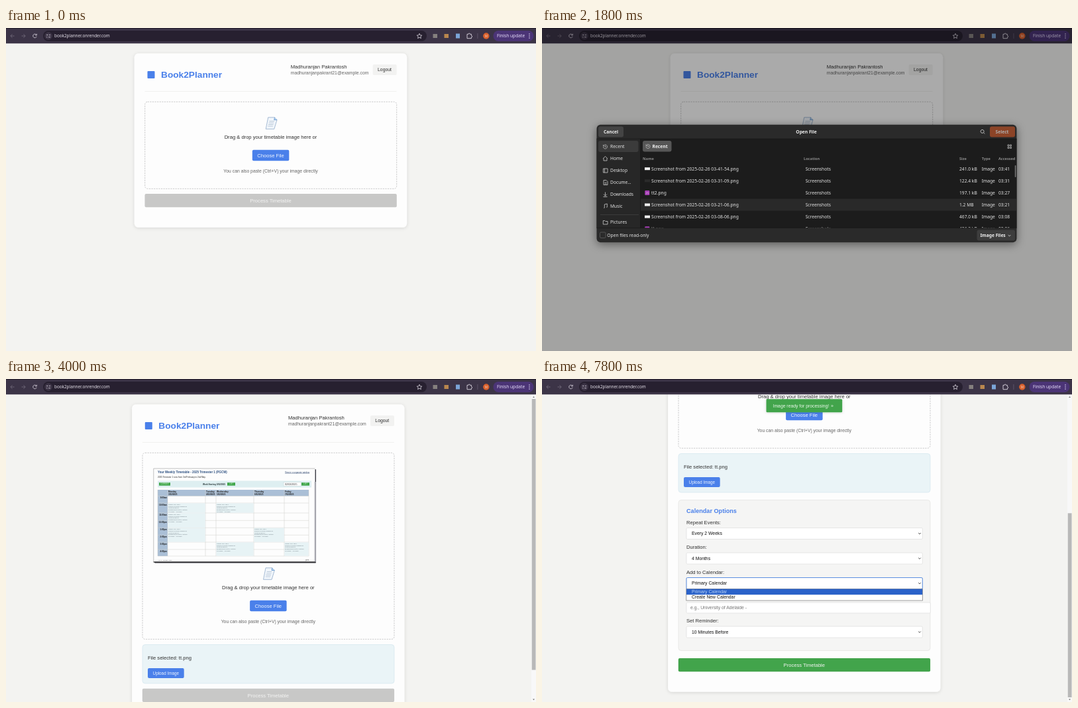
Write an HTML page that moves like this. It is 800 px wide and 487 px high and loops after 8000 ms.

```html
<!DOCTYPE html>
<html lang="en">
<head>
<meta charset="utf-8">
<title>Timetable upload</title>
<style>
html, body { margin: 0; width: 100%; height: 100%; overflow: hidden; background: #f3f3f1 }
svg { display: block; width: 800px; height: 487px }
text { white-space: pre }
.ui { font-family: "Noto Sans", "Open Sans", sans-serif }
.web { font-family: "Liberation Sans", Arial, sans-serif }
</style>
</head>
<body>
<script>
const BLUE = '#4a80ea', GREEN = '#42a44b', INK = '#303030';

// y is the middle of the capitals
const T = (x, y, s, size, fill, extra = '') =>
  `<text x="${x}" y="${y + size * .36}" font-size="${size}" fill="${fill}" ${extra}>${s}</text>`;
const R = (x, y, w, h, fill, r = 0, extra = '') =>
  `<rect x="${x}" y="${y}" width="${w}" height="${h}" rx="${r}" fill="${fill}" ${extra}/>`;
const P = (d, stroke, width = .8, fill = 'none') =>
  `<path d="${d}" stroke="${stroke}" stroke-width="${width}" fill="${fill}"/>`;
const G = (id, body, extra = '') => `<g id="${id}" ${extra}>${body}</g>`;
const MID = 'text-anchor="middle"', BOLD = 'font-weight="700"';
const line = c => `stroke="${c}" stroke-width=".7"`;
const clock = (x, y) => P(`M${x - 3} ${y}a3 3 0 1 0 1 -2.2M${x - 3} ${y - 3}v2h2M${x} ${y - 1.5}v1.7h1.4`, '#ccc', .7);
const down = (x, y, c) => P(`M${x - 1.8} ${y - .9}l1.8 1.8l1.8 -1.8`, c, .9);

function browserBar() {
  return R(0, 0, 800, 23.3, '#3c3447') + R(0, 0, 800, 1, '#211b29') +
    P('M12.5 12H7M9.5 9.3L6.8 12l2.7 2.7M23.5 12h5.5M26.500 9.3l2.7 2.7l-2.7 2.7', '#77707f') +
    P('M46 10.600a2.800 2.800 0 1 0 .2 2.200M46.300 8.700v2.200h-2.200', '#ddd8e2') +
    R(56, 4, 579, 16, '#272030', 8) +
    `<circle cx="64" cy="12" r="5.800" fill="#3d3547"/>` +
    P('M61 10.500h2.500M65 10.500h2M61 13.700h1.500M64 13.700h3', '#ddd8e2') +
    T(73, 12, 'book2planner.onrender.com', 6.35, '#e4dfe8') +
    P('M624 8.300l1.100 2.500l2.700 .3l-2 1.800l.6 2.700l-2.400 -1.400l-2.400 1.400l.6 -2.700l-2 -1.800l2.700 -.3z', '#ddd8e2', .8) +
    R(644.500, 9, 6.500, 6, '#85807e') + R(661.500, 9, 6.500, 6, '#b9874e') + R(679, 8.500, 6, 7, '#7ba5d8') +
    P('M696 9.300h2a1.200 1.200 0 0 1 2.400 0h2v2.300a1.200 1.200 0 0 1 0 2.400v1.700h-6.400z', '#ddd8e2', .9) +
    R(711.500, 8, .8, 8, '#665c72') +
    '<circle cx="724.800" cy="12" r="4.700" fill="#d9602c"/>' + T(724.8, 12, 'M', 4.6, '#f5d5c5', MID) +
    R(735.500, 4, 61, 16, '#4b3476', 8) + T(741, 12, 'Finish update', 6.65, '#e6dcfa') +
    [9, 12, 15].map(y => `<circle cx="790" cy="${y}" r=".8" fill="#e6dcfa"/>`).join('');
}

function preview() {
  const cols = [229, 244, 301, 317, 374, 420, 457];
  const rows = [176.5, 187, 202, 213.3, 224.3, 235.3, 246, 257, 267];
  const days = ['Monday', 'Tuesday', 'Wednesday', 'Thursday', 'Friday'];
  const hours = ['9:00am', '10:00am', '11:00am', '12:00pm', '1:00pm', '2:00pm', '3:00pm', '4:00pm'];
  const events = [[1, 1, 2], [1, 2, 4], [1, 4, 6], [3, 1, 2], [3, 6, 8], [4, 4, 6], [5, 6, 8]];
  const notes = ['COMP SCI 7312', 'Found of Comp Science B', 'Lecture/LE01/1', 'Engineering North, Lecture', '10:00am - 11:00am'];
  const go = (x, w) => R(x, 156.2, w, 4.5, '#3fa64a') + T(x + w / 2, 158.5, w > 14 ? 'CURRENT' : 'LIST', 2.6, '#d8f0d8', MID);
  let s = R(224, 136, 244, 141.500, '#44444c', 1) + R(222.500, 134.500, 244, 141, '#fdfdfd') +
    P('M222.800 276V135H466.500', '#999', .6) + R(465.500, 155, 2.200, 121, '#b9b9c0') + P('M222.500 276H467', '#222', 1.200) +
    T(229, 140, 'Your Weekly Timetable - 2025 Trimester 1 (PGCW)', 4.45, '#2c4f80', BOLD) +
    T(229, 148, '2025 Trimester 1 runs from 3rd February to 2nd May.', 3.1, '#222') +
    T(421, 140.5, 'View in a separate window', 3.15, '#223a66', 'text-decoration="underline"') +
    R(229, 153.5, 232, 10, '#deeff1') + go(231, 17) + go(334, 12) +
    T(297, 158.5, 'Week Starting 3/02/2025', 3, '#233', BOLD) +
    R(419, 155.5, 26, 6, '#fff', 0, line('#cdd')) + T(421, 158.5, '02/02/2025', 3.7, '#333') + go(446, 12) +
    R(229, 167, 228, 9.5, '#aabfd6') + R(229, 167, 15, 100, '#aabfd6');
  days.forEach((d, i) => s += T(cols[i + 1] + 1, 169.8, d, 3.2, '#222', BOLD) + T(cols[i + 1] + 1, 173.8, `${i + 3}/02/2025`, 3, '#222', BOLD));
  const grid = rows.map(y => `M229 ${y}H457`).join('') + cols.map(x => `M${x} 167V267`).join('');
  s += P(grid, '#cfcfcb', .5);
  for (const [c, a, b] of events) {
    s += R(cols[c] + .3, rows[a] + .3, cols[c + 1] - cols[c] - .6, rows[b] - rows[a] - .6, '#e7f3f5');
    notes.forEach((n, i) => s += T(cols[c] + 1, rows[a] + 2.2 + i * 2.7, n, 2.4, '#65717a'));
  }
  hours.forEach((h, i) => s += T(243, rows[i] + 2.5, h, 3, '#222', BOLD + ' text-anchor="end"'));
  return s + T(229, 273.5, '3 of 8 - Weekly view', 2.4, '#555') + T(452, 273.5, 'print', 2.6, '#555');
}

function options() {
  const field = (y, label, value) => T(218, y - 17, label, 7.6, INK) +
    R(218, y - 8.5, 356.3, 17, '#fff', 1.5, line('#ddd')) + T(226, y, value, 6.84, '#111') + down(570, y, '#333');
  return R(206, 182.5, 380, 227, '#f5f5f4', 4, line('#e2e2e0')) +
    T(218, 199, 'Calendar Options', 9.12, BLUE, BOLD) +
    field(233, 'Repeat Events:', 'Every 2 Weeks') + field(270.5, 'Duration:', '4 Months') +
    field(308, 'Add to Calendar:', 'Primary Calendar') +
    R(218, 337, 368.3, 16, '#fff', 1.5, line('#ddd')) +
    T(224, 345, 'e.g., University of Adelaide - ', 6.84, '#757575') +
    field(381.5, 'Set Reminder:', '10 Minutes Before') +
    G('menu', R(218, 299.5, 356.3, 17, 'none', 1.5, 'stroke="#5c8fe0"') +
      R(217.800, 316.500, 356.600, 17.500, '#fff', 0, line('#777')) + R(218, 316.700, 356.200, 8.500, '#2a62c9') +
      T(226, 321, 'Primary Calendar', 6.84, '#b9d2f7') + T(226, 329, 'Create New Calendar', 6.84, '#111'));
}

function page() {
  const dropInner =
    P('M395.700 134.800H405.500L409 138.500L404.800 152.300H392.200Z', '#91abc9', .8, '#f1f6fb') +
    P('M405.500 134.800L404.700 138.500H409', '#5f92cc', .8, '#b9d6f2') +
    P('M397.500 140.500h7.500M396.800 143h7.500M396.100 145.500h7.500M395.400 148h7.500', '#a5b7cb', .7) +
    T(399.5, 164, 'Drag &amp; drop your timetable image here or', 7.6, INK, MID) +
    R(371.800, 183.800, 55.500, 16.500, BLUE, 2, 'id="choose"') + T(399.5, 192, 'Choose File', 7.6, '#eef4ff', MID) +
    T(399.5, 215.2, 'You can also paste (Ctrl+V) your image directly', 6.84, '#666', MID);
  return R(193.800, 38.300, 411.300, 262.500, '#fdfdfd', 6, 'id="card" filter="url(#soft)"') +
    R(213.500, 65, 11, 11, BLUE, 1) + T(234, 70.5, 'Book2Planner', 13.7, BLUE, BOLD) +
    T(429.7, 58, 'Madhuranjan Pakrantosh', 7.6, INK) +
    T(429.7, 68, 'madhuranjanpakrant21@example.com', 6.84, '#666') +
    R(553.700, 55, 36, 16, '#f2f2f1', 2) + T(571.5, 63, 'Logout', 6.84, INK, MID) +
    R(209.500, 95, 380, .7, '#ececea') +
    R(209.700, 111.300, 380, 131, 'none', 4, 'id="zone" stroke="#c4c4c6" stroke-width=".9" stroke-dasharray="2.200 1.400"') +
    G('drop', dropInner) +
    G('file', preview() + R(206, 400.5, 380, 58.5, '#eaf4f7', 4, line('#d3e6ee')) +
      T(214, 420.3, 'File selected: tt.png', 7.6, INK) +
      R(214, 436, 54.700, 15, BLUE, 2, 'id="upload"') + T(241.3, 443.5, 'Upload Image', 6.33, '#eef4ff', MID),
      'transform="translate(3.700)"') +
    G('options', options(), 'transform="translate(3.700 288)"') +
    G('process', R(209.5, 0, 380.3, 20.3, '#c8c8c7', 2, 'id="processBox"') +
      T(399.5, 10.2, 'Process Timetable', 7.6, '#f4f4f3', MID));
}

function dialog() {
  const pale = '#e4e4e4', shots = ['03-41-54', '03-31-09', 0, '03-21-06', '03-08-06', 0];
  const sizes = ['241.0 kB', '122.4 kB', '197.1 kB', '1.2 MB', '467.0 kB', '436.2 kB'];
  const times = ['03:41', '03:31', '03:27', '03:21', '03:08', '03:06'];
  const rows = shots.map((shot, i) => {
    const y = 212.2 + 18.1 * i, name = shot ? `Screenshot from 2025-02-26 ${shot}.png` : i < 3 ? 'tt2.png' : 'tt.png';
    const thumb = shot ? R(155, y - 2, 8, 4, i == 1 ? '#2b2b2b' : '#f0f0f0')
      : R(155.300, y - 3.500, 7, 7, '#a63fb5', 1) + P(`M157 ${y + 1.500}l1.500 -2l1.500 1.500l1.300 -1`, '#e8c4ee', .7);
    const cell = (x, s) => T(x, y, s, 6.7, pale);
    return thumb + cell(165, name) + cell(397.7, 'Screenshots') + cell(630, sizes[i]) + cell(663.7, 'Image') + cell(689, times[i]);
  }).join('');
  const icons = ['', 'M92 197l3.500 -3.500l3.500 3.500M93 196.500v3.500h5v-3.500', 'M92.500 212h6.500v6h-6.500zM94.500 212v6',
    'M93 229.500h4l2 2v5h-6zM94.500 233h3M94.500 235h3', 'M95.500 247.500v5.500M93 250.700l2.500 2.500l2.500 -2.500M92.500 254.500h6',
    'M94.300 271v-5l4 -1v5M93.300 271.300h1M97.300 270.300h1', 'M92.300 290.500h2.500l1 1h3.200v4.500h-6.700z'];
  const places = ['Recent', 'Home', 'Desktop', 'Docume…', 'Downloads', 'Music', 'Pictures'];
  const side = places.map((s, i) => {
    const y = i < 6 ? 179 + 18 * i : 293;
    return (i ? P(icons[i], '#ccc', .8) : clock(95.500, y)) + T(103, y, s, 6.7, pale);
  }).join('');
  const heads = [[152, 'Name'], [395, 'Location'], [630, 'Size'], [663.7, 'Type'], [689, 'Accessed']]
    .map(([x, s]) => T(x, 196.7, s, 5.6, '#8d8d8d', BOLD)).join('');
  return R(82.500, 145.700, 634, 177.500, '#2c2c2c', 6, 'filter="url(#deep)"') +
    R(148.500, 167, 568, 134.500, '#1c1c1c') + R(82.500, 167, 66, 134.500, '#272727') +
    P('M82.500 167H716.500M82.500 301.500H716.500M148.500 167V301.500', '#161616', .6) +
    R(85, 148.500, 38, 16, '#444', 3) + T(104, 156.5, 'Cancel', 6.7, '#f2f2f2', MID + BOLD.padStart(18)) +
    T(399, 156.5, 'Open File', 6.7, '#f2f2f2', MID + BOLD.padStart(18)) +
    P('M666.300 157.700a2.500 2.500 0 1 1 .1 -.1l1.900 1.900', '#ddd') +
    G('select', R(676, 148.500, 38, 16, '#c85426', 3) + T(694.5, 156.5, 'Select', 6.7, '#fff', MID + BOLD.padStart(18))) +
    R(85, 170, 60.500, 17, '#3b3b3b', 3) + side + R(88, 281, 58, .7, '#444') +
    R(152, 170, 43.500, 16.500, '#565656', 3) + clock(160, 178.500) + T(166.5, 178.5, 'Recent', 6.7, '#f2f2f2', BOLD) +
    P('M703 176h2v2h-2zM706.500 176h2v2h-2zM703 179.500h2v2h-2zM706.500 179.500h2v2h-2z', '#ccc', .7) + heads +
    `<g clip-path="url(#list)">${G('rows', R(149, 0, 567, 18.1, '#292929', 0, 'id="mark"') + rows)}</g>` +
    R(713.800, 207, 1.600, 18, '#777', .8) +
    R(87.500, 308, 8.500, 8.500, '#2a2a2a', 1.500, line('#666')) + T(98.3, 312.5, 'Open files read-only', 6.7, pale) +
    R(656.500, 304.500, 57.500, 16, '#3d3d3d', 3) + T(661.5, 312.5, 'Image Files', 6.7, '#f2f2f2', BOLD) + down(705.500, 313, '#ddd');
}

document.body.innerHTML = `<svg viewBox="0 0 800 487" class="web">
<defs>
  <filter id="soft" x="-10%" y="-10%" width="120%" height="120%"><feDropShadow dx="0" dy="1" stdDeviation="2.500" flood-opacity=".13"/></filter>
  <filter id="deep" x="-10%" y="-20%" width="120%" height="150%"><feDropShadow dx="0" dy="3" stdDeviation="7" flood-opacity=".45"/></filter>
  <clipPath id="view"><path d="M0 23.300H800V487H0z"/></clipPath>
  <clipPath id="list"><path d="M149 203H716V301.200H149z"/></clipPath>
</defs>
${R(0, 0, 800, 487, '#f3f3f1')}
<g clip-path="url(#view)">${G('page', page())}</g>
${G('bar', R(793, 23, 7, 464, '#f8f8f8') + R(793.700, 30, 5.800, 400, '#b8b8b8', 0, 'id="thumb"') +
  P('M795 28l1.500 -1.800l1.500 1.800zM795 482.500l1.500 1.800l1.500 -1.800z', 'none', 0, '#666'))}
${G('toast', R(338.5, 30.3, 114.7, 20, GREEN, 1.5, 'filter="url(#soft)"') +
  T(348.5, 40.3, 'Image ready for processing!', 6.84, '#eaf8ea') + T(436, 40, '»', 7, '#eaf8ea'))}
<g class="ui">${browserBar()}</g>
${R(0, 0, 800, 487, '#000', 0, 'id="dim"')}
${G('dialog', dialog(), 'class="ui"')}
</svg>`;

const $ = id => document.getElementById(id);
const set = (id, attrs) => { for (const k in attrs) $(id).setAttribute(k, attrs[k]); };
const show = (id, on) => set(id, { display: on ? 'inline' : 'none' });
const move = (id, x, y) => set(id, { transform: `translate(${x} ${y})` });
// value of the last [time, value] pair reached
const at = (t, steps) => steps.reduce((v, [when, next]) => t >= when ? next : v, steps[0][1]);

function draw(now) {
  const t = Math.floor(now % 8000 / 200) * 200;
  const file = t >= 4000, ready = t >= 5200;
  const scroll = at(t, [[0, 0], [6200, 77.5], [6400, 205], [6600, 288]]);
  const processY = ready ? 709 : file ? 466.7 : 250;

  move('page', file ? -3.7 : 0, -scroll);
  set('card', { height: ready ? 721.5 : file ? 480 : 262.5 });
  set('zone', { height: file ? 281 : 131 });
  move('drop', 0, file ? 150 : 0);
  move('process', 0, processY);
  set('processBox', { fill: ready ? GREEN : '#c8c8c7' });
  show('file', file);
  show('options', ready);
  show('menu', t >= 7800);
  set('choose', { fill: t >= 600 && !file ? '#3768d6' : BLUE });
  set('upload', { fill: t >= 4800 && t < 6200 ? '#3768d6' : BLUE });

  const docHeight = ready ? 752 : 511;
  show('bar', file);
  set('thumb', { y: 30 + scroll * 450 / docHeight, height: 464 * 450 / docHeight });
  set('toast', { opacity: Math.min(1, Math.max(0, (t - 5000) / 800)) });
  set('dim', { opacity: at(t, [[0, 0], [800, .09], [1000, .33], [3800, .09], [4000, 0]]) });

  const picked = t >= 3000;
  const row = at(t, [[0, 1], [1600, 2], [1800, 3], [2000, 4], [2400, 5]]);
  show('dialog', t >= 1000 && t < 3800);
  show('rows', t >= 1200);
  move('rows', 0, -at(t, [[0, 0], [2200, 3], [2400, 6.5], [2600, 9.3]]));
  set('mark', { y: 203.2 + 18.1 * row, fill: picked ? '#6a2d18' : '#292929',
    stroke: picked ? '#b5603f' : 'none', 'stroke-width': .7, 'stroke-dasharray': '1 1' });
  set('select', { opacity: at(t, [[0, .62], [3000, .8], [3200, 1]]) });
}

(function loop() {
  draw(performance.now());
  requestAnimationFrame(loop);
})();
</script>
</body>
</html>
```
